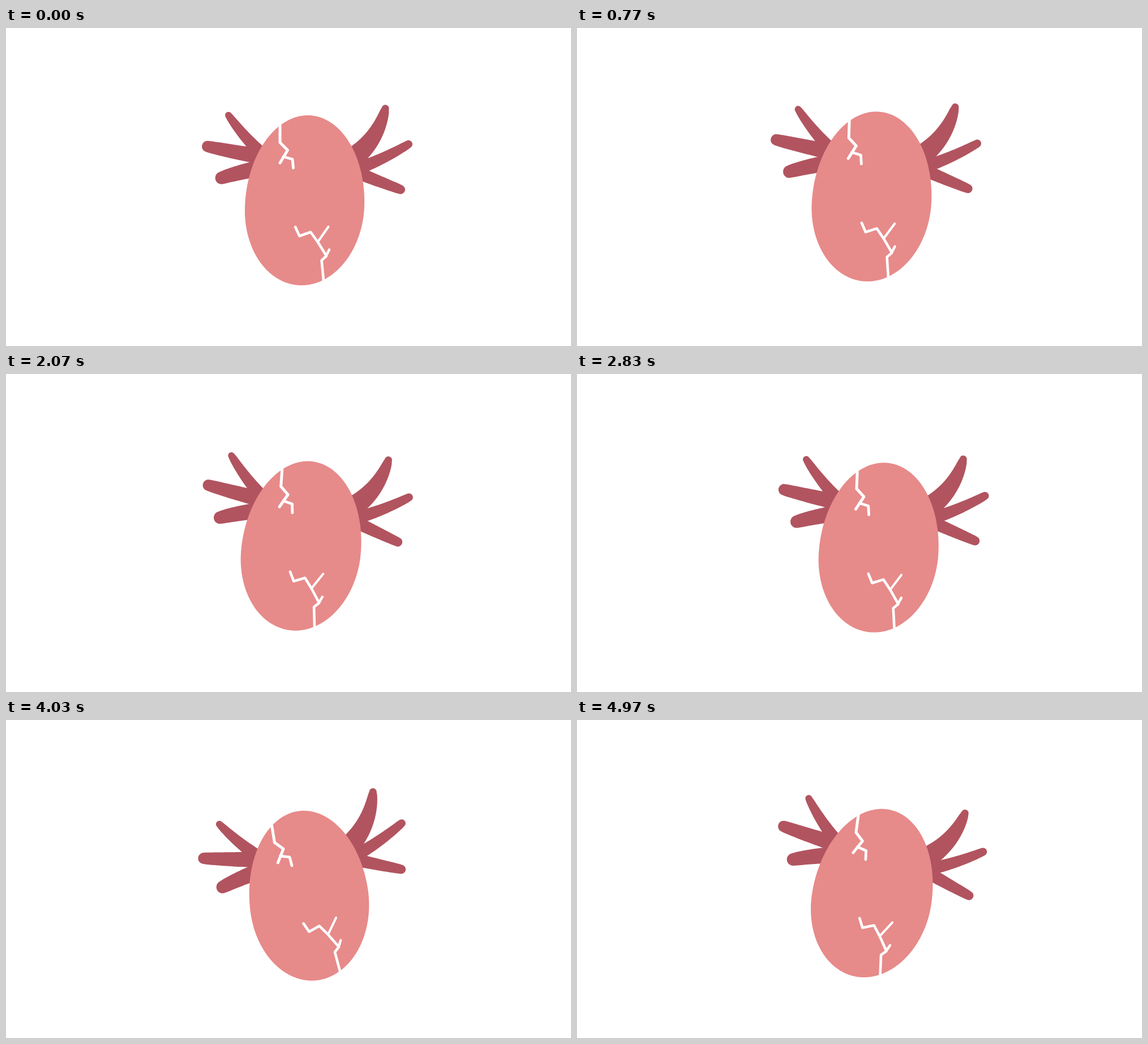
Animation, 998 px wide and 561 px high, one loop 5.01 s. Source, as an HTML page with a canvas:

```html
<!DOCTYPE html>
<html lang="en">
<head>
<meta charset="utf-8">
<title>Shaking egg</title>
<style>
  html, body { margin: 0; width: 100%; height: 100%; overflow: hidden; background: #fff; }
  canvas { display: block; }
</style>
</head>
<body>
<canvas id="stage" width="998" height="561"></canvas>
<script>
const ctx = document.getElementById('stage').getContext('2d');
const LOOP = 5010, LAST = 149;
const PIVOT = { x: 527, y: 258 };

// Key poses of the shake: time, shift x, shift y, turn in degrees
const poses = [
  [0, 0, 0, 0],
  [480, -1, -18, 10.3],
  [770, -5.5, -6.7, 1.7],
  [1060, -5.5, -2.3, -5],
  [1330, -2, 1, -1],
  [1630, 1, 2, -5.5],
  [2070, -2.5, -0.7, 4.1],
  [2640, 3, 9, 1.2],
  [2830, 7.5, 2.2, 2.4],
  [3370, -1.5, -11.5, 12.4],
  [3740, -1, -2, -5.5],
  [4030, -1, 6.5, -9.4],
  [4680, 2.7, 1, 11.2],
  [4970, 0.7, 1.7, 7.9]
];

// Spine from tip to hidden root, with the radius at either end
const gills = [
  { tip: [393, 154], bend: [426, 201], root: [470, 238], r0: 6, r1: 12.5 },
  { tip: [356, 209], bend: [413, 221], root: [470, 230], r0: 10, r1: 14.5 },
  { tip: [380.5, 264.5], bend: [415, 253], root: [470, 243], r0: 11, r1: 15 },
  { tip: [670, 142], bend: [655, 204], root: [600, 238], r0: 6.5, r1: 20 },
  { tip: [711, 205], bend: [656, 238], root: [600, 255], r0: 7, r1: 12 },
  { tip: [697, 285], bend: [649, 267], root: [600, 247], r0: 8, r1: 12 }
];

const cracks = [
  [5, [484, 172], [484, 202], [497.5, 215.5], [484, 238]],
  [4.8, [490, 227], [506, 231.5], [507.5, 247]],
  [4.6, [511, 351], [518.5, 367], [538, 360], [551, 378], [566, 402], [557.5, 410], [561, 446]],
  [4, [551, 377], [569.5, 350.5]],
  [4.4, [565, 403], [571, 391]]
];

function slope(i, k) {
  const a = poses[Math.max(0, i - 1)];
  const b = poses[Math.min(poses.length - 1, i + 1)];
  return (b[k] - a[k]) / (b[0] - a[0]);
}

// Smooth motion through the key poses
function poseAt(t) {
  let i = 0;
  while (i < poses.length - 2 && poses[i + 1][0] <= t) i++;
  const a = poses[i], b = poses[i + 1];
  const span = b[0] - a[0];
  const u = (t - a[0]) / span, v = 1 - u;
  return [1, 2, 3].map(k =>
    a[k] * (1 + 2 * u) * v * v + b[k] * u * u * (3 - 2 * u) +
    span * u * v * (slope(i, k) * v - slope(i + 1, k) * u));
}

const startOf = i => Math.round(i * 10 / 3) * 10;

// Thirty pictures a second, on ten-millisecond marks
function snap(t) {
  let i = Math.min(LAST, Math.floor((t + 5) * 0.03));
  if (startOf(i) > t) i--;
  return startOf(i);
}

// Rounded lobe that widens along a bent spine
function drawGill({ tip, bend, root, r0, r1 }) {
  const steps = 24;
  const edge = (n, side) => {
    const u = n / steps, v = 1 - u;
    const [x, y] = [0, 1].map(k => v * v * tip[k] + 2 * u * v * bend[k] + u * u * root[k]);
    const [dx, dy] = [0, 1].map(k => v * (tip[k] - bend[k]) + u * (bend[k] - root[k]));
    const r = side * (r0 + (r1 - r0) * u ** 0.7) / Math.hypot(dx, dy);
    ctx.lineTo(x - dy * r, y + dx * r);
  };
  const heading = Math.atan2(tip[1] - bend[1], tip[0] - bend[0]);
  ctx.beginPath();
  ctx.arc(tip[0], tip[1], r0, heading - Math.PI / 2, heading + Math.PI / 2);
  for (let n = 0; n <= steps; n++) edge(n, 1);
  for (let n = steps; n >= 0; n--) edge(n, -1);
  ctx.fill();
}

// Leaning oval, taller above its widest line than below
function drawEgg() {
  ctx.beginPath();
  for (let n = 0; n < 120; n++) {
    const a = n * Math.PI / 60, up = Math.cos(a);
    ctx.lineTo(527.5 + 5.5 * up + 105.5 * Math.sin(a), 315 - up * (up > 0 ? 161 : 139));
  }
  ctx.fill();
}

function drawCrack([width, ...pts]) {
  ctx.lineWidth = width;
  ctx.beginPath();
  pts.forEach(p => ctx.lineTo(...p));
  ctx.stroke();
}

function draw(t) {
  const [dx, dy, turn] = poseAt(snap(t));
  ctx.setTransform(1, 0, 0, 1, 0, 0);
  ctx.fillStyle = '#fff';
  ctx.fillRect(0, 0, 998, 561);
  ctx.translate(PIVOT.x + dx, PIVOT.y + dy);
  ctx.rotate(turn * Math.PI / 180);
  ctx.translate(-PIVOT.x, -PIVOT.y);

  ctx.fillStyle = '#b1545f';
  gills.forEach(drawGill);
  ctx.fillStyle = '#e78a8a';
  drawEgg();
  ctx.strokeStyle = '#fff';
  ctx.lineCap = ctx.lineJoin = 'round';
  cracks.forEach(drawCrack);
}

const begin = performance.now();
function tick() {
  draw((performance.now() - begin) % LOOP);
  requestAnimationFrame(tick);
}
tick();
</script>
</body>
</html>
```
